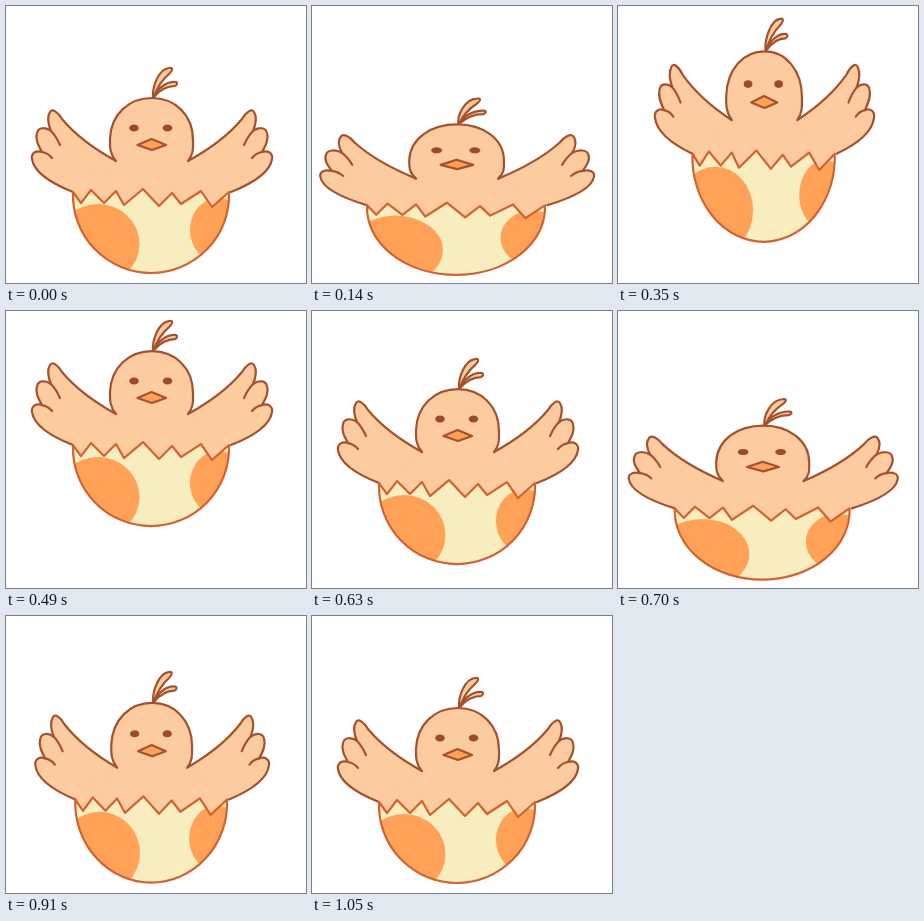
Write an HTML page that moves like this. It is 300x277 px and loops after 1120 ms.

```html
<!DOCTYPE html>
<html lang="en">
<head>
<meta charset="utf-8">
<title>Hatching chick</title>
<style>
  html, body { margin: 0; width: 100%; height: 100%; overflow: hidden; background: #fff; }
  svg { display: block; width: 100vw; height: 100vh; }
  path { vector-effect: non-scaling-stroke; }
  #chick { stroke-width: 2.2; stroke-linejoin: round; stroke-linecap: round; }
  .skin { fill: #fdcba0; stroke: #a4522e; }
  .torso { fill: #fdcba0; stroke: #fdcba0; }
  .line { fill: none; stroke: #a4522e; }
  .rim { fill: none; stroke: #d2622f; }
  .spot { fill: #ffa258; }
  .eye { fill: #9c4b29; }
</style>
</head>
<body>
<svg viewBox="0 0 300 277">
  <defs>
    <path id="shell" d="M67 186 L75 197 85 184 98 197 110 185 118 199 137 183 153 200 166 187 175 198 195 185 206 201 223 186 A78 78 0 0 1 145 267 A78 78 0 0 1 67 186Z"/>
    <clipPath id="inside"><use href="#shell"/></clipPath>
    <g id="wing">
      <path class="skin" d="M110 155 C90 144 71 131 56 113 C52 106 46 102 44 106 C41 111 42 118 45 125
        C40 121 32 121 31 127 C29 133 32 139 36 146 C30 144 25 147 26 153 C28 167 47 178 67 186"/>
      <path class="line" d="M45 125 Q50 130 54 139 M36 146 Q42 147 46 152"/>
    </g>
  </defs>
  <g id="chick">
    <path class="skin" d="M147 92 C146 80 153 63 163 62 C167 61 167 64 164 67 C157 73 151 81 148 91"/>
    <path class="skin" d="M148 91 C150 84 160 75 170 76 C172 77 171 79 169 80 C160 80 153 85 148 91"/>
    <path class="torso" d="M68 186 L110 155 H182 L223 186 207 203 H75Z"/>
    <use href="#wing"/>
    <use href="#wing" transform="translate(292) scale(-1 1)"/>
    <path class="skin" d="M110 155 C103 147 104 139 104 133 C105 108 123 92 146 92 C169 92 187 109 187 134 C187 141 188 148 182 155"/>
    <ellipse class="eye" cx="128" cy="122" rx="4.800" ry="3.500"/>
    <ellipse class="eye" cx="161.500" cy="122" rx="4.800" ry="3.500"/>
    <path class="spot" stroke="#a4522e" d="M131.500 139 L145.500 133 160 139 146 144Z"/>
    <use href="#shell" fill="#f8edbf"/>
    <g class="spot" clip-path="url(#inside)">
      <ellipse cx="92" cy="238" rx="41.500" ry="40"/>
      <ellipse cx="212" cy="224" rx="28" ry="32"/>
    </g>
    <use href="#shell" class="rim"/>
  </g>
</svg>
<script>
  const STEP = 70, STEPS = 16;
  const LEAP = 4, AIR = 6, LAND = 9;      // steps at which each phase begins
  const crouch = [0, -0.14, 0.175, 0];    // rest, squash, stretch, airborne
  const anchor = { x: 152, y: 281 };
  const chick = document.getElementById("chick");

  function stretch(i) {
    if (i < AIR) {
      const k = Math.floor(i / 2);
      return crouch[k] + (crouch[k + 1] - crouch[k]) * (i / 2 - k);
    }
    const n = Math.max(0, i - LAND);
    return -0.228 * Math.sin(n * Math.PI / 3) * Math.exp(-n / 2);
  }

  function height(i) {
    if (i < AIR) return Math.max(0, i - LEAP) * 30;
    return Math.max(0, 60.5 - 3.8 * (i - 5.5) ** 2);
  }

  function draw() {
    const i = Math.floor(performance.now() / STEP) % STEPS;
    const s = stretch(i);
    chick.setAttribute("transform",
      `translate(${anchor.x} ${anchor.y - height(i)}) scale(${1 - s} ${1 + s}) translate(${-anchor.x} ${-anchor.y})`);
    requestAnimationFrame(draw);
  }
  draw();
</script>
</body>
</html>
```
